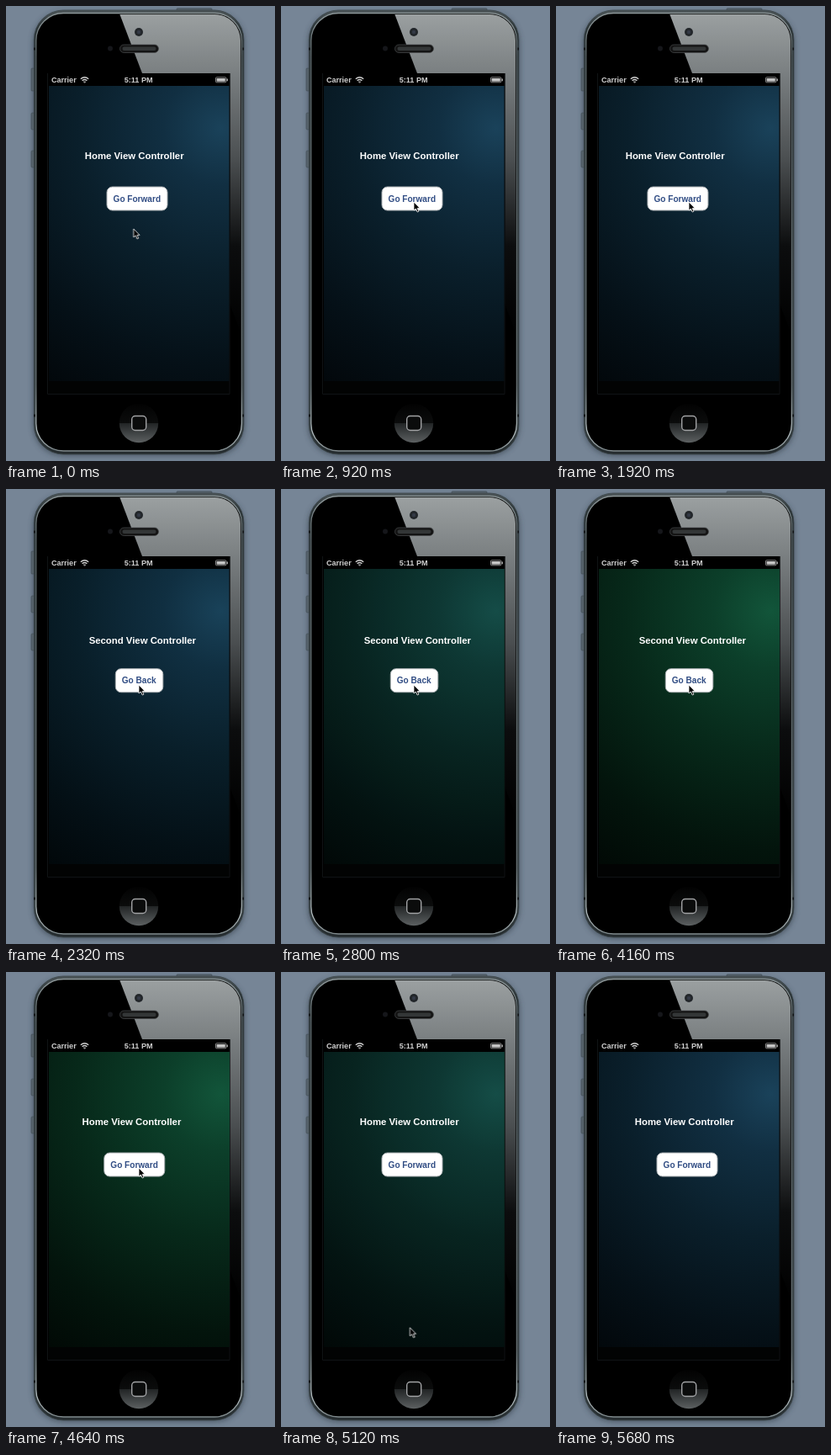
These frames come from a looping animation (320 by 541 pixels, 5840 ms). An HTML page:

```html
<!DOCTYPE html>
<html lang="en">
<head>
<meta charset="utf-8">
<title>View controller transition</title>
<style>
html, body { margin: 0; width: 100%; height: 100%; overflow: hidden; background: #768596; }
svg { display: block; width: 320px; height: 541px; }
text { font-family: "Liberation Sans", Arial, sans-serif; font-weight: bold; fill: #fff; text-anchor: middle; }
.status { font-size: 9.1px; fill: #d0d0d0; }
.title { font-size: 11.36px; }
.label { font-size: 10.07px; fill: #314d84; }
.hot text { fill: #fff; }
.face { fill: #fff; stroke: #a8adb0; }

/* One loop: push, fade to green, pop, fade to blue */
.home, .second, .green, .hot, .cursor { animation: 5840ms ease-in-out infinite; }
.home { animation-name: home; }
.second { animation-name: second; }
.green { animation-name: tint; }
.hot { animation-timing-function: step-end; }
.home .hot { animation-name: press-forward; }
.second .hot { animation-name: press-back; }
.cursor { animation-name: cursor; }

@keyframes home {
  0%, 31.8% { transform: translateX(0); }
  38.65%, 73.22% { transform: translateX(-215px); }
  80.07%, 100% { transform: translateX(0); }
}
@keyframes second {
  0%, 31.8% { transform: translateX(215px); }
  38.65%, 73.22% { transform: translateX(0); }
  80.07%, 100% { transform: translateX(215px); }
}
@keyframes tint {
  0%, 38.65% { opacity: 0; }
  55.77%, 80.07% { opacity: 1; }
  97.19%, 100% { opacity: 0; }
}
@keyframes press-forward {
  0% { opacity: 0; }
  28.08% { opacity: 1; }
  28.77%, 100% { opacity: 0; }
}
@keyframes press-back {
  0% { opacity: 0; }
  70.55% { opacity: 1; }
  71.23%, 100% { opacity: 0; }
}
@keyframes cursor {
  0% { transform: translate(151.7px, 265px); animation-timing-function: ease-out; }
  8.2%, 84.9% { transform: translate(158px, 233px); }
  90%, 100% { transform: translate(150px, 560px); }
}
</style>
</head>
<body>
<svg viewBox="0 0 320 541">
  <defs>
    <linearGradient id="rim" x2="0" y2="1">
      <stop stop-color="#4d5659"/><stop offset=".04" stop-color="#2b3437"/>
      <stop offset=".5" stop-color="#363f42"/><stop offset=".93" stop-color="#394245"/>
      <stop offset="1" stop-color="#242b2e"/>
    </linearGradient>
    <linearGradient id="edge" x2="0" y2="1">
      <stop stop-color="#8d9799"/><stop offset=".1" stop-color="#596366"/>
      <stop offset=".85" stop-color="#667073"/><stop offset=".96" stop-color="#b4bec0"/>
      <stop offset="1" stop-color="#7e888b"/>
    </linearGradient>
    <linearGradient id="gloss" x2="0" y2="1">
      <stop stop-color="#9ba0a1"/><stop offset=".2" stop-color="#777c7e"/>
      <stop offset=".45" stop-color="#4b4f51"/><stop offset=".72" stop-color="#0c0d0e"/>
      <stop offset="1" stop-color="#000"/>
    </linearGradient>
    <radialGradient id="blue" gradientUnits="userSpaceOnUse" cx="256" cy="145" r="380">
      <stop stop-color="#1a425a"/><stop offset=".18" stop-color="#112f42"/>
      <stop offset=".45" stop-color="#0a1f2b"/><stop offset=".75" stop-color="#051017"/>
      <stop offset="1" stop-color="#020609"/>
    </radialGradient>
    <radialGradient id="leaf" gradientUnits="userSpaceOnUse" cx="256" cy="145" r="380">
      <stop stop-color="#12553a"/><stop offset=".18" stop-color="#0c3f2a"/>
      <stop offset=".45" stop-color="#07291a"/><stop offset=".75" stop-color="#03140c"/>
      <stop offset="1" stop-color="#010704"/>
    </radialGradient>
    <linearGradient id="dish" x2="0" y2="1">
      <stop stop-color="#020202"/><stop offset=".49" stop-color="#0b0c0c"/>
      <stop offset=".51" stop-color="#222526"/><stop offset="1" stop-color="#5c6061"/>
    </linearGradient>
    <linearGradient id="pressed" x2="0" y2="1">
      <stop stop-color="#4a95f2"/><stop offset="1" stop-color="#0a5ce0"/>
    </linearGradient>
    <filter id="blur" x="-20%" y="-20%" width="140%" height="140%"><feGaussianBlur stdDeviation="3"/></filter>
    <clipPath id="front"><rect x="37" y="10" width="242" height="518" rx="31"/></clipPath>
    <clipPath id="screen"><rect x="51" y="95" width="214.5" height="351"/></clipPath>
  </defs>

  <rect width="320" height="541" fill="#768596"/>

  <!-- Phone body -->
  <rect x="32" y="7" width="252" height="528" rx="36" fill="#2a343f" opacity=".55" filter="url(#blur)"/>
  <g fill="#56626b" stroke="#414c54" stroke-width=".6">
    <rect x="203" y="2.8" width="42" height="4" rx="1"/>
    <rect x="30" y="74" width="4" height="27" rx="1"/>
    <rect x="30" y="127" width="4" height="20" rx="1.5"/>
    <rect x="30" y="172" width="4" height="20" rx="1.5"/>
  </g>
  <rect x="33.3" y="5" width="249.6" height="528" rx="35" fill="url(#rim)" stroke="#3a4448" stroke-width=".8"/>
  <path d="M33 51h3M280 51h3M33 487h3M280 487h3" stroke="#15181a" stroke-width="3"/>
  <rect x="35.8" y="8.5" width="244.6" height="520.5" rx="32.5" stroke="url(#edge)" stroke-width="1.3"/>
  <path clip-path="url(#front)" d="M135 9H281V393Z" fill="url(#gloss)"/>

  <!-- Camera, sensor, speaker -->
  <circle cx="158" cy="31" r="5" fill="#22262a"/>
  <circle cx="158" cy="31" r="2.2" fill="#343a46"/>
  <circle cx="124" cy="50.5" r="3" fill="#15161a"/>
  <rect x="135.5" y="46" width="46" height="9.5" rx="4.7" fill="#141414" stroke="#4a4d4e" stroke-width=".7"/>
  <rect x="138.5" y="48.5" width="40" height="4.5" rx="2.2" fill="#333637"/>

  <!-- Screen -->
  <rect x="49" y="80" width="217.5" height="382" fill="#000"/>
  <rect x="51" y="446" width="214.5" height="15" fill="#020303"/>
  <path d="M49.5 80V461.5H266V80" fill="none" stroke="#101315"/>
  <g clip-path="url(#screen)">
    <rect x="50" y="95" width="216" height="351" fill="url(#blue)"/>
    <rect class="green" x="50" y="95" width="216" height="351" fill="url(#leaf)"/>
    <g class="home">
      <text class="title" x="152.7" y="182">Home View Controller</text>
      <rect class="face" x="120" y="215" width="72" height="28" rx="6.5"/>
      <text class="label" x="155.8" y="232.6">Go Forward</text>
      <g class="hot">
        <rect x="120" y="215" width="72" height="28" rx="6.5" fill="url(#pressed)"/>
        <text class="label" x="155.8" y="232.6">Go Forward</text>
      </g>
    </g>
    <g class="second">
      <text class="title" x="162.3" y="184.3">Second View Controller</text>
      <rect class="face" x="130.3" y="213.7" width="56.5" height="28" rx="6.5"/>
      <text class="label" x="158.2" y="231.3">Go Back</text>
      <g class="hot">
        <rect x="130.3" y="213.7" width="56.5" height="28" rx="6.5" fill="url(#pressed)"/>
        <text class="label" x="158.2" y="231.3">Go Back</text>
      </g>
    </g>
  </g>

  <!-- Status bar -->
  <text class="status" x="68.8" y="91.2">Carrier</text>
  <text class="status" x="157.6" y="91.2">5:11 PM</text>
  <g fill="none" stroke="#d0d0d0" stroke-width="1.3">
    <path d="M88.8 86.8Q93.5 82.6 98.2 86.8M90.6 88.8Q93.5 86.2 96.4 88.8"/>
    <path d="M92.4 90.1L93.5 91.2 94.6 90.1Z" stroke-width=".9"/>
  </g>
  <rect x="249.5" y="84.8" width="12.4" height="6" rx="1" fill="none" stroke="#aaa" stroke-width=".8"/>
  <path d="M250.6 85.9h10.2v3.8h-10.2ZM262.5 86.4h1.3v2.8h-1.3Z" fill="#c4c4c4"/>

  <!-- Home button -->
  <circle cx="158" cy="496" r="23.2" fill="url(#dish)"/>
  <rect x="149.7" y="487.5" width="17" height="17" rx="4" fill="#0b0c0c" stroke="#a2a3a5" stroke-width="1.4"/>

  <path class="cursor" d="M0 0V10L2.4 8 4.2 12 5.9 11.2 4.2 7.4H7.2Z" fill="#000" stroke="#fff" stroke-width=".8"/>
</svg>
</body>
</html>
```
